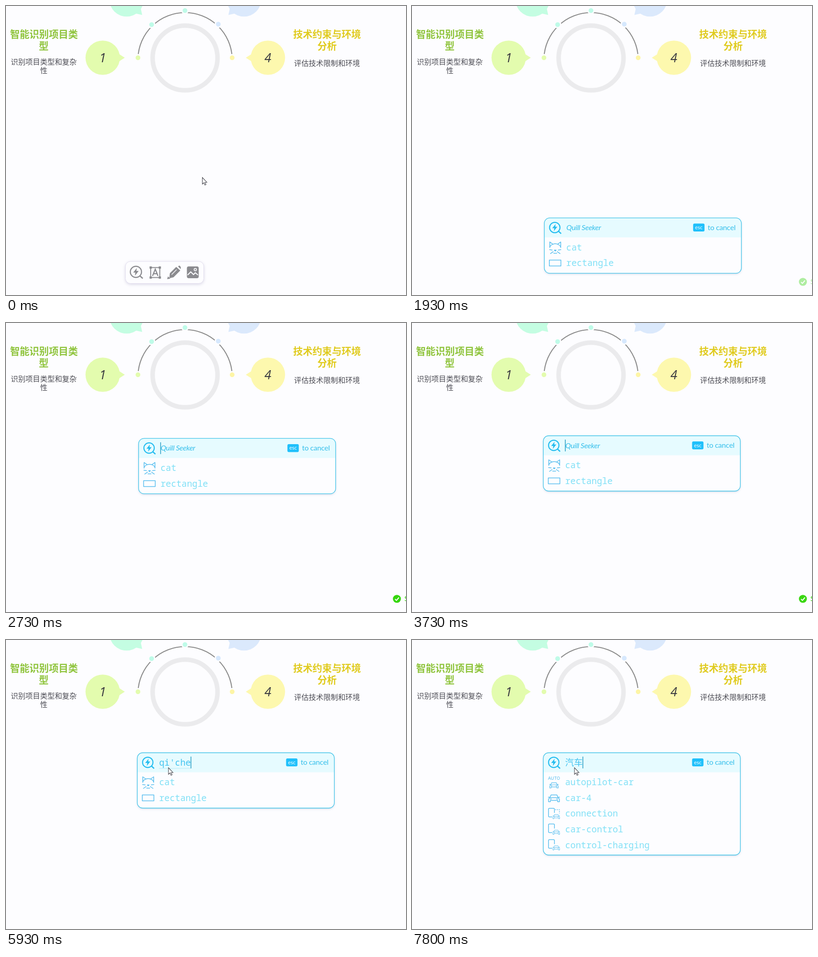
An HTML page that plays this animation: 879x637 px, repeating every 8 s.

```html
<!DOCTYPE html>
<html lang="zh">
<head>
<meta charset="utf-8">
<title>Canvas search</title>
<style>
  html, body { margin: 0; width: 100%; height: 100%; overflow: hidden; background: #fdfdff; }
  svg { display: block; width: 879px; height: 637px; }
  .cjk { font-family: "Noto Sans CJK SC", sans-serif; text-anchor: middle; }
  .title { font-size: 21.3px; font-weight: 700; }
  .note { font-size: 16.1px; font-weight: 300; fill: #4c4c54; }
  .num { font: italic 500 27px "Open Sans", sans-serif; text-anchor: middle; fill: #38383f; }
  .mono { font: 400 19.35px "Noto Sans Mono", "Noto Sans CJK SC", monospace; }
  .ui { font: 16.2px Lato, sans-serif; letter-spacing: -.3px; fill: #35bfeb; }
  .hint { font-style: italic; }
  .row { fill: #80e0f6; }
  .line { fill: none; stroke: #55bdee; stroke-width: 1.5; stroke-linejoin: round; }
  .line * { vector-effect: non-scaling-stroke; }
</style>
</head>
<body>
<svg viewBox="0 0 879 637">
  <defs>
    <g id="finder">
      <circle r="12.3" fill="none" stroke="currentColor" stroke-width="2.4"/>
      <path d="M8.7 8.7 15 14.5" stroke="currentColor" stroke-width="2.8"/>
      <path d="M2-8.5-6 1.5H-1.2L-2.2 8.5 6-2H1Z" fill="currentColor"/>
    </g>
    <path id="car" d="M-9-1-6.5-7H6.5L9-1M-12 8V2L-9-1H9L12 2V8H8V5H-8V8ZM-13-2H-9M9-2H13M-9 2H-5M5 2H9"/>
    <path id="phone" d="M1-2V-10a2 2 0 0 0-2-2H-10a2 2 0 0 0-2 2V5a2 2 0 0 0 2 2H-4"/>
    <filter id="soft" x="-10%" y="-20%" width="120%" height="150%">
      <feDropShadow dx="0" dy="2" stdDeviation="2" flood-color="#6a7ab0" flood-opacity=".28"/>
    </filter>
  </defs>

  <g id="diagram">
    <circle cx="393.5" cy="114.5" r="71.3" fill="none" stroke="#ebebed" stroke-width="10"/>
    <path d="M290 114A103.6 104 0 0 1 497 114" fill="none" stroke="#8b8b8b" stroke-width="2.1"/>
  </g>
  <g class="cjk title" fill="#8fc43c">
    <text x="83.5" y="70">智能识别项目类</text><text x="83" y="96">型</text>
  </g>
  <g class="cjk note">
    <text x="83" y="129">识别项目类型和复杂</text><text x="83" y="148">性</text>
    <text x="705.5" y="132">评估技术限制和环境</text>
  </g>
  <g class="cjk title" fill="#e0cb1e">
    <text x="705.5" y="70">技术约束与环境</text><text x="705.5" y="96">分析</text>
  </g>

  <g id="toolbar" color="#8b8b8f">
    <rect id="glow" x="262.5" y="563" width="172" height="48.5" rx="11" fill="#fdfdff" stroke="#e2deee"/>
    <use href="#finder" x="285.5" y="586"/>
    <g fill="none" stroke="currentColor" stroke-width="2">
      <path d="M318 576.5H338V598.5H318Z"/>
      <path d="M322 595 328 580 334 595M324 590H332" stroke-width="2.4"/>
    </g>
    <path d="M315.5 574h5v5h-5zm20 0h5v5h-5zm-20 22h5v5h-5zm20 0h5v5h-5z" fill="currentColor"/>
    <path d="M374 575 383 583 368 598 359 600 360 589ZM378 574 381 572 384 575 384 580ZM356 596 361 601 354 602Z" fill="currentColor"/>
    <path d="M364 592 375 581" stroke="#fdfdff" stroke-width="1.5"/>
    <rect x="397.5" y="574" width="26" height="26" rx="4" fill="currentColor"/>
    <path d="M399 593 406 586 412 592 416 588 422 593" fill="none" stroke="#fdfdff" stroke-width="2.2"/>
    <circle cx="416" cy="581" r="2.6" fill="none" stroke="#fdfdff" stroke-width="1.7"/>
  </g>

  <g id="toast">
    <circle cx="859" cy="608" r="8.8" fill="#35d60c"/>
    <path d="M855 608.5 858 611.5 863.5 605" fill="none" stroke="#fff" stroke-width="2"/>
    <text x="875.5" y="613" font-family="Lato, sans-serif" font-size="16" fill="#35d60c">S</text>
  </g>

  <g id="panel">
    <rect id="box" width="433" height="122.5" rx="12" fill="#fdfdff" filter="url(#soft)"/>
    <path d="M0 43V12A12 12 0 0 1 12 0H421A12 12 0 0 1 433 12V43Z" fill="#e6fbff"/>
    <rect id="edge" width="433" height="122.5" rx="12" fill="none" stroke="#3cc3e8" stroke-width="1.3"/>
    <use href="#finder" color="#25bdf0" transform="translate(23 21.2) scale(.93)"/>
    <text id="hint" class="ui hint" x="48.5" y="27">Quill Seeker</text>
    <text id="query" class="mono" x="48" y="28" fill="#45c4f0"></text>
    <path id="under" stroke="#7fd6ee" stroke-dasharray="1 1"/>
    <rect id="caret" y="8.5" width="1.6" height="26" fill="#2b9fc4"/>
    <rect x="327" y="12.5" width="25" height="17.5" rx="3" fill="#1fc0fb"/>
    <text x="339.5" y="25" font-family="Lato, sans-serif" font-size="11.5" text-anchor="middle" fill="#fff">esc</text>
    <text class="ui" x="359" y="26.5">to cancel</text>

    <g id="recent">
      <g class="line">
        <path d="M12 66V53L19 58Q24 56 29 58L36 53V66M12 65Q13 60 19 58M36 65Q35 60 29 58M11 70 18 71M37 70 30 71M13 79 20 74M35 79 28 74M22 71H26L24 73ZM20 78H28"/>
        <path d="M11 93H36.5V106H11Z"/>
      </g>
    </g>
    <g id="found">
      <g id="icons" class="line">
        <g transform="translate(23.5 65.5)">
          <text y="-6" font-family="Inter, sans-serif" font-size="9.5" text-anchor="middle" fill="#55bdee" stroke="none">AUTO</text>
          <use href="#car" transform="translate(0 6) scale(.78)"/>
        </g>
        <use href="#car" transform="translate(23.5 100)"/>
        <g transform="translate(23.5 134.5)">
          <use href="#phone"/><use href="#car" transform="translate(5 6) scale(.62)"/>
          <path d="M3-9H12V-1" stroke-dasharray="2 2"/>
        </g>
        <g transform="translate(23.5 169)">
          <use href="#phone"/><use href="#car" transform="translate(5 6) scale(.62)"/>
        </g>
        <g transform="translate(23.5 203.5)">
          <use href="#phone"/><use href="#car" transform="translate(5 6) scale(.62)"/>
        </g>
      </g>
    </g>
  </g>

  <g id="ime">
    <rect x="330" y="289" width="543" height="34" rx="6" fill="#fcfcfe" stroke="#e3e3ea" filter="url(#soft)"/>
    <text id="picks" x="342" y="310" font-family="Noto Sans CJK SC, sans-serif" font-size="15" fill="#444" xml:space="preserve"></text>
  </g>

  <path id="cursor" d="M0 0V14.5L3.4 11.5 5.6 16.7 8 15.6 5.8 10.7H10Z" fill="#fff" stroke="#44444c" stroke-width="1.1"/>
</svg>
<script>
const LOOP = 8000, BLINK = 466.7, CHAR = 11.61;
const $ = id => document.getElementById(id);
const NS = 'http://www.w3.org/2000/svg';

function add(parent, tag, attrs, text = '') {
  const el = document.createElementNS(NS, tag);
  for (const k in attrs) el.setAttribute(k, attrs[k]);
  el.textContent = text;
  parent.appendChild(el);
  return el;
}

// Numbered drops: centre, pointer angle, colour, label
[[212.5, 114, 0, '#e3fcae', '1'], [265, -14.5, 45, '#c4fde2', ''],
 [523, -14.5, 135, '#dbe9fc', ''], [575.5, 114, 180, '#fdf8ae', '4']].forEach(([x, y, a, fill, label]) => {
  const g = add($('diagram'), 'g', { transform: `translate(${x} ${y})`, fill });
  add(g, 'circle', { r: 37.8 });
  add(g, 'path', { d: 'M36-8 48.5 0 36 8Z', transform: `rotate(${a})` });
  add(g, 'text', { class: 'num', y: 9.5 }, label);
});

[[290, 114, '#e3fcae'], [320, 41, '#bffbe8'], [393.3, 10, '#bffbe8'],
 [466.5, 40, '#d6e8fd'], [497, 114, '#fdf5a6']].forEach(([cx, cy, fill]) =>
  add($('diagram'), 'circle', { cx, cy, r: 6.7, fill, stroke: '#fdfdff', 'stroke-width': 3 }));

function listRows(parent, names) {
  names.forEach((name, i) => add(parent, 'text', { class: 'mono row', x: 48, y: 71.8 + 34.55 * i }, name));
}
listRows($('recent'), ['cat', 'rectangle']);
listRows($('found'), ['autopilot-car', 'car-4', 'connection', 'car-control', 'control-charging']);

const typing = [[0, ''], [4930, 'q'], [5000, 'qi'], [5330, "qi'c"], [5530, "qi'ch"], [5670, "qi'che"], [5995, '汽车']];
const picks = {
  q: '去 请 其 前 全 却 起', qi: '其 起 期 七 气 器 奇',
  "qi'c": '其次 汽车 七成 起初 器材', "qi'ch": '汽车 起初 七成 期初 其中', "qi'che": '汽车 骑车 七车 气车 汽'
};
const mouse = [[40, 431.5, 378], [300, 398, 432], [600, 325, 545], [870, 299, 588]];
const drag = [[1730, 231.5, 555.5], [1930, 290.5, 467.5], [2130, 344, 396], [2330, 370.5, 345.5],
  [2600, 315.5, 282.5], [2730, 291.5, 254.5], [2930, 288.5, 248.5]];

const clamp = v => Math.max(0, Math.min(1, v));
const ramp = (t, a, b) => clamp((t - a) / (b - a));
const show = (id, on) => { $(id).style.display = on ? '' : 'none'; };
const setText = (id, s) => { if ($(id).textContent !== s) $(id).textContent = s; };

// Smooth curve through [time, x, y] stops, at rest at both ends
function along(stops, t) {
  const last = stops.length - 1;
  if (t <= stops[0][0]) return stops[0].slice(1);
  if (t >= stops[last][0]) return stops[last].slice(1);
  const i = stops.findIndex(s => s[0] > t) - 1;
  const p = stops[i], q = stops[i + 1], d = q[0] - p[0], u = (t - p[0]) / d;
  const slope = (n, k) => n === 0 || n === last ? 0
    : (stops[n + 1][k] - stops[n - 1][k]) / (stops[n + 1][0] - stops[n - 1][0]);
  return [1, 2].map(k => {
    const w = u * u * (3 - 2 * u);
    return p[k] + (q[k] - p[k]) * w
      + d * u * (1 - u) * ((1 - u) * slope(i, k) - u * slope(i + 1, k));
  });
}

function draw(t) {
  const open = t >= 1400, found = t >= 6995;
  show('toolbar', !open);
  const hover = ramp(t, 500, 850);
  $('glow').style.filter = `drop-shadow(0 2px ${3 + 3 * hover}px rgba(100,90,150,${.22 + .1 * hover}))`;

  show('cursor', !open || t >= 5925);
  const [mx, my] = open ? [357, 281.5] : along(mouse, t);
  $('cursor').setAttribute('transform', `translate(${mx} ${my})`);

  $('toast').setAttribute('opacity', ramp(t, 1750, 2220) * (1 - ramp(t, 3700, 4860)));

  show('panel', open);
  $('panel').setAttribute('transform', `translate(${along(drag, t).join(' ')})`);
  const height = found ? 225.5 : 122;
  $('box').setAttribute('height', height);
  $('edge').setAttribute('height', height);
  show('recent', !found);
  show('found', found);
  show('icons', t >= 7200);

  const text = typing.filter(s => s[0] <= t).pop()[1];
  const done = text === '汽车', composing = text && !done;
  const width = done ? 38.7 : text.length * CHAR;
  setText('query', text);
  show('hint', !text);
  $('under').setAttribute('d', composing ? `M48 34.5H${48 + width}` : '');

  const since = t >= 5930 ? 5930 : 1400;
  $('caret').setAttribute('x', 47.5 + width);
  show('caret', composing || Math.floor((t - since) / BLINK) % 2 === 0);

  const choosing = composing && t < 5925;
  show('ime', choosing);
  if (choosing) setText('picks', picks[text].split(' ').map((w, i) => `${i + 1} ${w}`).join('    '));
}

const start = performance.now();
function frame(now) {
  draw(Math.max(0, now - start) % LOOP);
  requestAnimationFrame(frame);
}
draw(0);
requestAnimationFrame(frame);
</script>
</body>
</html>
```
